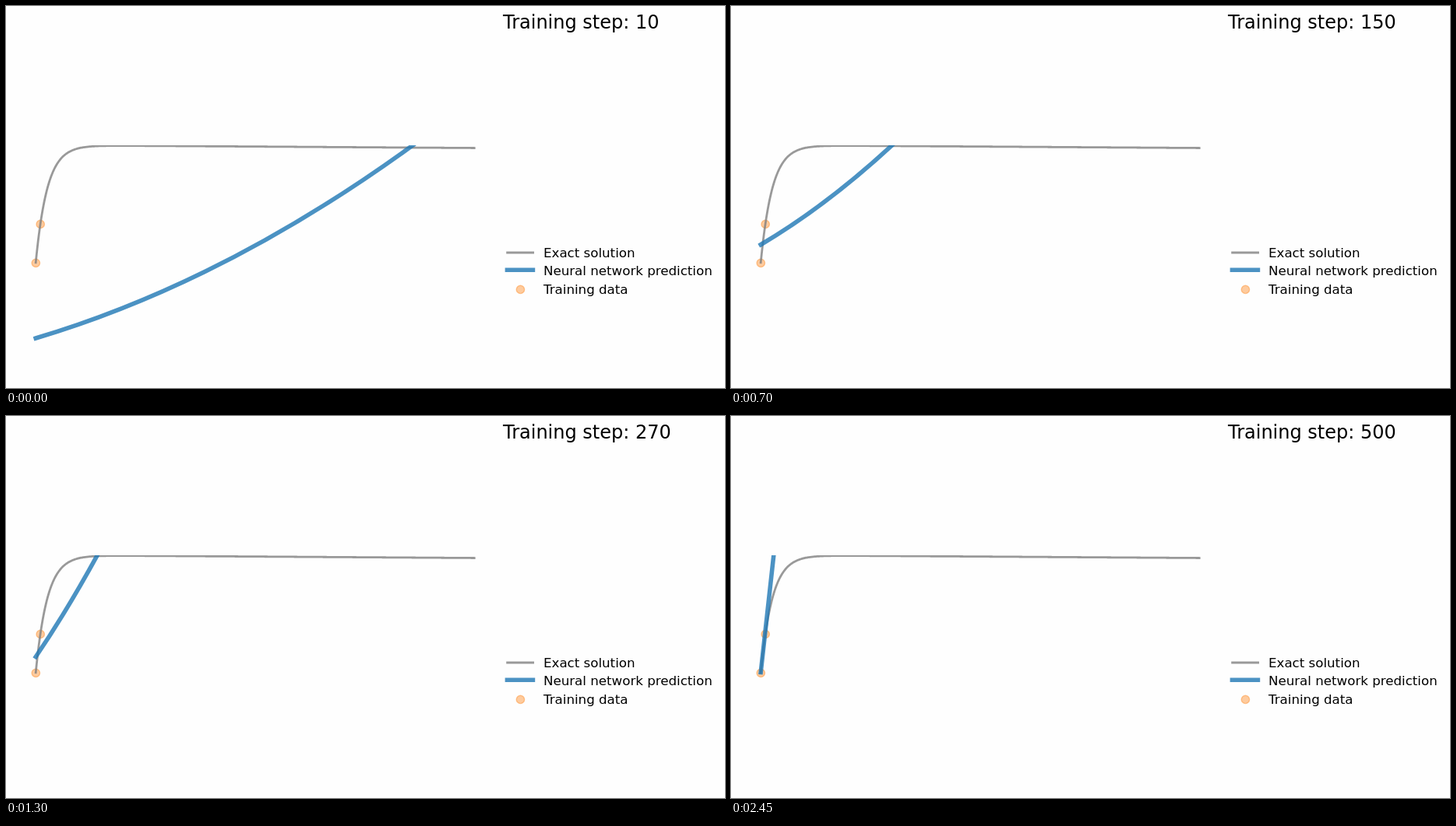
Animation of 923 by 491 pixels, one loop 2500 ms. Source, as an HTML page:

```html
<!DOCTYPE html>
<html lang="en">
<head>
<meta charset="utf-8">
<title>Training progress</title>
<style>
  html, body { margin: 0; width: 100%; height: 100%; overflow: hidden; background: #fefefe; }
  svg { display: block; }
  text { font: 16.667px "DejaVu Sans", sans-serif; }
  #title { font-size: 24px; }
  path { fill: none; stroke-linecap: square; stroke-linejoin: round; opacity: .8; }
  .exact { stroke: gray; stroke-width: 2.78; }
  .guess { stroke: #1f77b4; stroke-width: 5.56; }
  circle { fill: #ff7f0e; fill-opacity: .4; stroke: #ff7f0e; stroke-opacity: .4; stroke-width: 1.39; r: 5.2px; }
</style>
</head>
<body>
<svg width="923" height="491" viewBox="0 0 923 491">
  <clipPath id="axes"><rect y="179" width="630" height="312"/></clipPath>
  <g clip-path="url(#axes)">
    <circle cx="38.3" cy="330.3"/>
    <circle cx="44.2" cy="280.4"/>
    <path id="exact" class="exact"/>
    <path id="guess" class="guess"/>
  </g>
  <text id="title" x="638" y="29"></text>
  <path class="exact" d="M643.6 317H676.6"/>
  <path class="guess" d="M643.4 339.2H676.4"/>
  <circle cx="660.4" cy="364.4"/>
  <text x="690" y="323">Exact solution</text>
  <text x="690" y="346">Neural network prediction</text>
  <text x="690" y="370">Training data</text>
</svg>
<script>
const LEFT = 38.2, RIGHT = 602, TOP = 179;
const get = id => document.getElementById(id);

// step, start height, horizontal run to the top edge, sag below the chord
const keys = [
  [10, 427, 484, 26],
  [30, 345, 350, 17],
  [50, 302, 268, 12],
  [70, 301, 242, 11],
  [110, 306, 212, 9],
  [190, 307.5, 134, 5],
  [270, 309.5, 79, 3.5],
  [350, 314, 42.3, 1.8],
  [430, 324, 21.5, .4],
  [460, 327.3, 18.6, .2],
  [500, 329.5, 16.6, 0]
];

function stateAt(step) {
  const i = Math.max(1, keys.findIndex(k => k[0] >= step));
  const a = keys[i - 1], b = keys[i];
  const f = (step - a[0]) / (b[0] - a[0]);
  const mix = n => a[n] + (b[n] - a[n]) * f;
  return { y: mix(1), run: a[2] * (b[2] / a[2]) ** f, sag: mix(3) };
}

function guessPath({ y, run, sag }) {
  const curve = 4 * sag / run ** 2;
  const slope = (y - TOP) / run - curve * run;
  const end = run * 1.15;
  return `M${LEFT} ${y}Q${LEFT + end / 2} ${y - slope * end / 2} ` +
    `${LEFT + end} ${y - slope * end - curve * end ** 2}`;
}

function exactPath() {
  const points = [];
  for (let x = LEFT; x <= RIGHT; x++) {
    const d = x - LEFT;
    points.push(`${x} ${178.8 + .0066 * d + 151 * Math.exp(-.0673 * d)}`);
  }
  return "M" + points.join("L");
}

function draw() {
  const step = 10 + 10 * Math.floor(performance.now() % 2500 / 50);
  get("title").textContent = "Training step: " + step;
  get("guess").setAttribute("d", guessPath(stateAt(step)));
  requestAnimationFrame(draw);
}

get("exact").setAttribute("d", exactPath());
draw();
</script>
</body>
</html>
```
